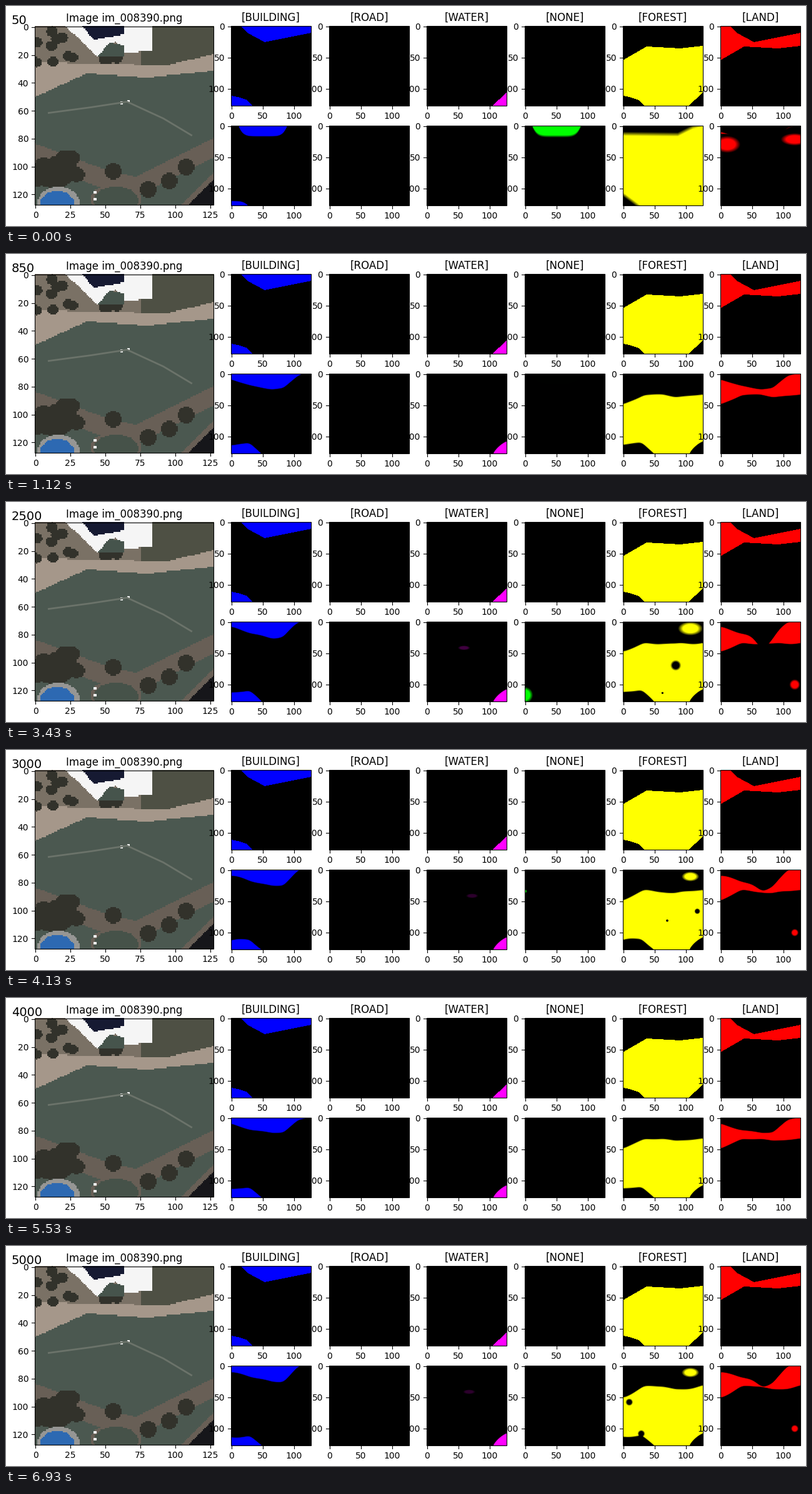
Recreate the animation shown at these times as a matplotlib script. Size 1280 px wide and 353 px high, loop 7 s.

```python
import numpy as np
import matplotlib.pyplot as plt
from matplotlib.animation import FuncAnimation
from matplotlib.path import Path
from matplotlib.patches import Rectangle

W, H, DPI = 1280, 353, 100
FRAMES, INTERVAL = 100, 70
N = 128
PT = DPI / 72

CLASSES = {
    "BUILDING": (0, 0, 255),
    "ROAD": (0, 255, 255),
    "WATER": (255, 0, 255),
    "NONE": (0, 255, 0),
    "FOREST": (255, 255, 0),
    "LAND": (255, 0, 0),
}

Y, X = np.mgrid[0:N, 0:N] + 0.5
GRID = np.column_stack([X.ravel(), Y.ravel()])
COL = X[0]


def line(*points):
    """Height of a polyline in every column."""
    return np.interp(COL, *np.transpose(points))


def smooth(y, reach=18):
    g = np.hanning(reach + 1)
    return np.convolve(np.pad(y, reach // 2, mode="edge"), g / g.sum(), "valid")


def mix(a, b, u):
    return a + (b - a) * u


def ramp(d, soft=1.5):
    return np.clip(0.5 + d / soft, 0, 1)


def radius(x, y, rx, ry):
    return np.hypot((X - x) / rx, (Y - y) / ry)


def spot(x, y, rx, ry):
    """Soft-edged ellipse."""
    return ramp(1 - radius(x, y, max(rx, 0.1), max(ry, 0.1)), 0.5)


def inside(points):
    return Path(points).contains_points(GRID).reshape(N, N)


# What the network starts from, and what it settles on
DOME = 17 - 17 * np.abs((COL - 51) / 39) ** 6
START_LAWN = line((0, 13), (88, 14), (112, 2), (128, -2))
START_YARD = 121 + 7 * (COL / 27) ** 4
START_FOOT = 110 + 0.75 * COL
ROOF = smooth(line((0, 10), (32, 19), (66, 25), (84, 24), (108, 3), (128, -2)))
LAWN = smooth(line((0, 50), (34, 34), (64, 34), (84, 38), (128, 33)))
YARD = smooth(line((0, 115), (30, 112), (52, 130), (66, 150), (128, 200)))
PINCH = np.exp(-((COL - 68) / 14) ** 2)


def predict(i):
    """Probability map of every class at step i."""
    rng = np.random.default_rng(40 + i)
    fresh = np.exp(-i / 3)
    skill = 1 - fresh
    unrest = (1 - np.cos(2 * np.pi * (i - 16) / 63)) / 2 * skill

    def ripple():
        a, b = rng.uniform(0, 2 * np.pi, 2)
        amp = skill * (0.6 + 1.2 * unrest)
        return amp * (np.sin(COL / 14 + a) + 0.6 * np.sin(COL / 8 + b))

    shift = ripple()
    roof = mix(DOME, ROOF + shift, skill)
    bare = ROOF + shift + 15 * unrest ** 2 * PINCH
    lawn = mix(START_LAWN, LAWN + ripple(), skill)
    shift = ripple()
    yard = mix(START_YARD, YARD + shift, skill)
    foot = mix(START_FOOT, YARD - 1 + shift, skill)

    size = 21 * skill + 0.1
    reach = ((N - X) ** 1.3 + (1.1 * (N - Y)) ** 1.3) ** (1 / 1.3)
    pond = ramp(size - reach)
    soft = 2 + 5 * fresh

    forest = ramp(Y - lawn, soft) * ramp(foot - Y, soft) * (1 - pond)
    land = ramp(Y - bare) * ramp(lawn - Y)
    land = land + fresh * (spot(11, 30, 17, 11) + spot(119, 22, 18, 8))
    none = fresh * ramp(DOME - Y, 4)

    # Stray patches grow while the training is restless
    forest = forest + spot(108, 11, 16 * unrest, 9 * unrest)
    land = land + spot(119, 101, 7 * unrest, 7 * unrest)
    for _ in range(2):
        r = 9 * unrest * rng.random()
        forest = forest - spot(rng.uniform(0, N), rng.uniform(50, 118), r, r)
    r = 12 * unrest * rng.random()
    none = none + spot(rng.choice([0, N]), rng.uniform(0, N), r, r)
    smudge = 0.25 * unrest * spot(rng.uniform(50, 115), 42, 8, 3)

    maps = {
        "BUILDING": np.maximum(ramp(roof - Y), ramp(Y - yard)),
        "ROAD": np.zeros((N, N)),
        "WATER": pond + smudge,
        "NONE": none,
        "FOREST": forest,
        "LAND": land,
    }
    return {k: np.clip(m, 0, 1) for k, m in maps.items()}


def truth():
    """Hand-labelled outlines, sharing their borders."""
    valley = [(15, 0), (26, 11), (54, 26), (128, 11)]
    ridge = [(128, 32), (92, 36), (38, 33), (0, 55)]
    yard = [(0, 112), (11, 114), (26, 119), (34, 128)]
    shore = [(128, 107), (105, 128)]
    empty = np.zeros((N, N))
    return {
        "BUILDING": inside(valley + [(128, 0)]) | inside(yard + [(0, 128)]),
        "ROAD": empty,
        "WATER": inside(shore + [(128, 128)]),
        "NONE": empty,
        "FOREST": inside(ridge[::-1] + shore + yard[::-1]),
        "LAND": inside([(0, 0)] + valley + ridge),
    }


def tint(m, color):
    return (m[..., None] * np.array(color)).astype(np.uint8)


def aerial():
    """Flat-shape view of a lawn with a path, trees, a house and a pool."""
    rng = np.random.default_rng(5)
    img = np.empty((N, N, 3), np.uint8)
    img[:] = (75, 88, 80)
    sand, earth, tree = (165, 151, 138), (104, 95, 86), (50, 50, 43)
    white, dark = (245, 245, 245), (22, 22, 26)

    def oval(color, x, y, rx, ry):
        img[radius(x, y, rx, ry) < 1] = color

    def grove(count, x0, x1, y0, y1, r):
        for _ in range(count):
            oval(tree, rng.uniform(x0, x1), rng.uniform(y0, y1), r, r * 0.9)

    top = line((0, 26), (46, 27), (95, 28), (128, 20))
    low = line((0, 51), (37, 34), (80, 37), (128, 32))
    rim = line((0, 84), (45, 101), (72, 108), (128, 80))
    img[Y < low] = sand
    img[Y < top] = (122, 113, 101)
    img[(Y < top) & (X > 76)] = (78, 80, 68)
    img[(Y > rim) & (Y < rim + 14)] = earth
    grove(9, 0, 30, 3, 26, 4)
    grove(3, 34, 62, 23, 26, 4)
    grove(30, 0, 30, 94, 111, 6)

    img[inside([(22, 0), (84, 0), (84, 18), (64, 19), (58, 11), (45, 22), (28, 6)])] = white
    img[inside([(34, 0), (64, 0), (64, 6), (42, 10)])] = (22, 26, 50)
    img[inside([(45, 22), (53, 12), (64, 14), (64, 22)])] = (70, 84, 76)

    oval(earth, 58, 124, 18, 11)
    oval((70, 82, 73), 58, 125, 16, 10)
    for x, y in [(56, 104), (81, 117), (96, 111), (108, 101)]:
        oval(tree, x, y, 6, 6)
    oval((150, 150, 148), 17, 127, 15, 12)
    oval((45, 105, 178), 16, 127, 12, 9)
    img[X + Y > 232] = earth
    img[X + Y > 237] = dark
    for x, y in [(62, 55), (67, 54), (43, 119), (43, 124)]:
        oval(white, x, y, 1, 1)
    return img


fig = plt.figure(figsize=(W / DPI, H / DPI), dpi=DPI, facecolor="white")
ax = fig.add_axes([0, 0, 1, 1])


def panel(x, y, size, pixels, title=None, xstep=50, ystep=50):
    """Image with frame, ticks and labels, placed in stage pixels."""
    im = ax.imshow(pixels, extent=(x, x + size, y + size, y),
                   interpolation="nearest", aspect="auto")
    ax.add_patch(Rectangle((x, y), size, size, fill=False, lw=0.8, zorder=3))
    tick, pad, unit = 3.5 * PT, 7 * PT, size / N
    base = y + size
    for v in range(0, N, xstep):
        p = x + (v + 0.5) * unit
        ax.plot([p, p], [base, base + tick], "k", lw=0.8, zorder=3)
        ax.text(p, base + pad, str(v), size=10, ha="center", va="top")
    for v in range(0, N, ystep):
        p = y + (v + 0.5) * unit
        ax.plot([x - tick, x], [p, p], "k", lw=0.8, zorder=3)
        ax.text(x - pad, p, str(v), size=10, ha="right", va="center_baseline")
    if title:
        ax.text(x + size / 2, y - 6 * PT, title, size=12, ha="center")
    return im


left, top, side = 46, 32.8, 286.4
panel(left, top, side, aerial(), "Image im_008390.png", 25, 20)
trail = np.array([(10, 62), (40, 58), (66, 54), (92, 66), (112, 78)]) * side / N
ax.plot(left + trail[:, 0], top + trail[:, 1], color="#6b736a", lw=2)

live = {}
masks, first = truth(), predict(0)
for k, (name, color) in enumerate(CLASSES.items()):
    x = round(360.2 + 156.6 * k)
    panel(x, 32, N, tint(masks[name], color), f"[{name}]")
    live[name] = panel(x, 192, N, tint(first[name], color))

counter = ax.text(9, 29, "50", size=14)
ax.set(xlim=(0, W), ylim=(H, 0))
ax.axis("off")


def update(i):
    counter.set_text(str(50 * (i + 1)))
    for name, m in predict(i).items():
        live[name].set_data(tint(m, CLASSES[name]))
    return [counter, *live.values()]


anim = FuncAnimation(fig, update, frames=FRAMES, interval=INTERVAL,
                     repeat=True, repeat_delay=0, blit=False)
plt.show()
```
